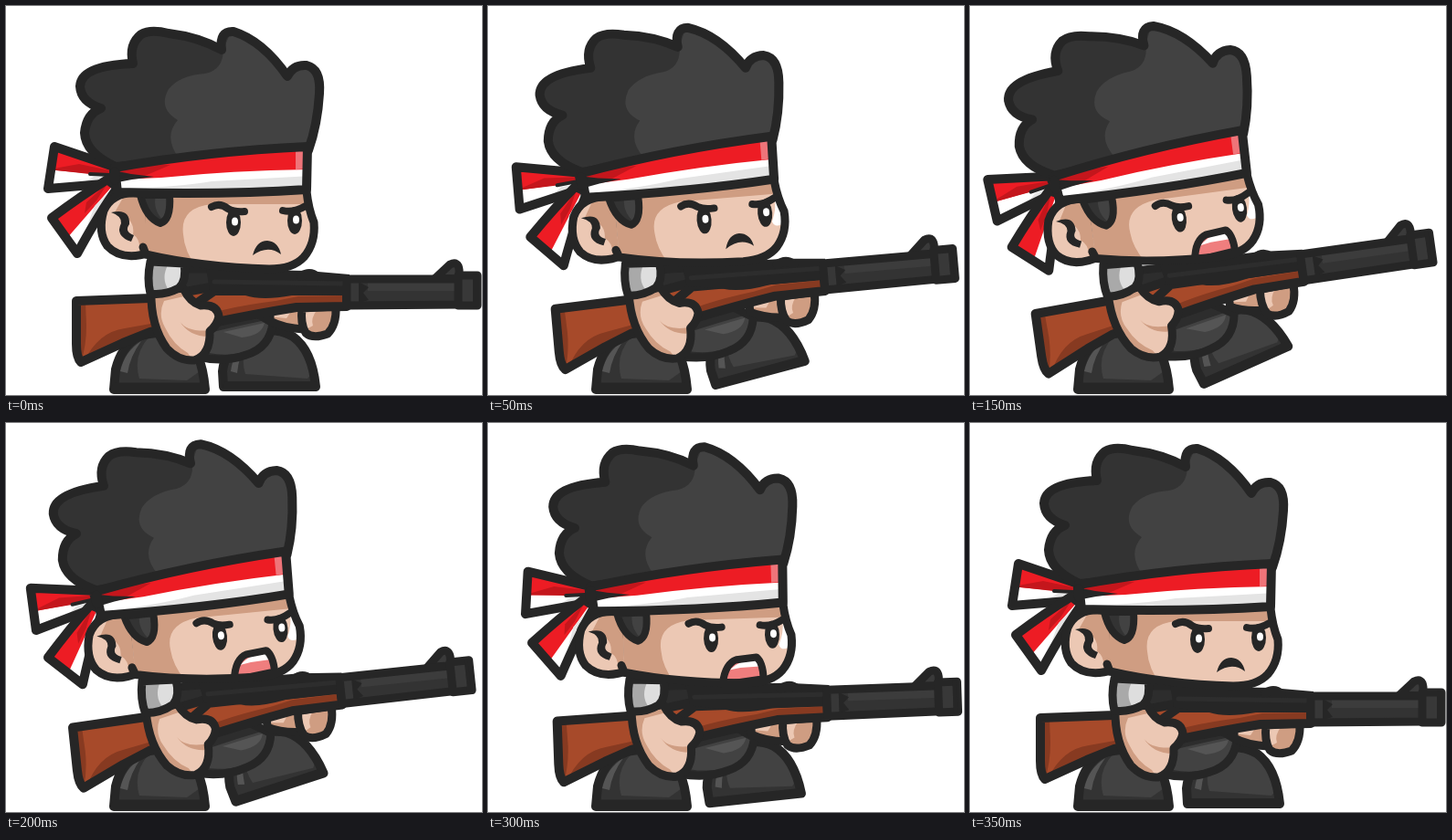
An HTML page with a canvas that plays this animation: 521 px wide and 426 px high, repeating every 0.5 s.

```html
<!DOCTYPE html>
<html lang="en">
<head>
<meta charset="utf-8">
<title>Soldier aiming</title>
<style>
html, body { margin: 0; width: 100%; height: 100%; overflow: hidden; background: #fff; }
canvas { display: block; width: 521px; height: 426px; }
</style>
</head>
<body>
<canvas id="stage" width="521" height="426"></canvas>
<script>
const ctx = document.getElementById('stage').getContext('2d');
const LOOP = 500, STEP = 50;
const INK = '#262626', HAIR = '#333333', GREY = '#424242', PALE_GREY = '#555555';
const RED = '#ed1c24', DEEP_RED = '#c4161c', WHITE = '#ffffff', SILVER = '#e4e4e4';
const SKIN = '#ecc8b4', TAN = '#cf9d82';
const WOOD = '#a74a2a', DARK_WOOD = '#873a21';

const cache = new Map();
function path(d) {
  if (!cache.has(d)) cache.set(d, new Path2D(d));
  return cache.get(d);
}
function fill(d, color) {
  ctx.fillStyle = color;
  ctx.fill(path(d));
}
function line(d, width = 10, color = INK) {
  ctx.lineWidth = width;
  ctx.strokeStyle = color;
  ctx.stroke(path(d));
}
// Outlined shape whose shading is clipped to its inside.
function shape(d, color, shades = [], width = 10) {
  fill(d, color);
  ctx.save();
  ctx.clip(path(d));
  for (const [s, c] of shades) fill(s, c);
  ctx.restore();
  line(d, width);
}
function oval(x, y, rx, ry, color) {
  ctx.fillStyle = color;
  ctx.beginPath();
  ctx.ellipse(x, y, rx, ry, 0, 0, Math.PI * 2);
  ctx.fill();
}
// Turns a part about the joint (x, y), which itself shifts by (dx, dy).
function part(amount, x, y, dx, dy, degrees, draw) {
  ctx.save();
  ctx.translate(x + dx * amount, y + dy * amount);
  ctx.rotate(degrees * amount * Math.PI / 180);
  ctx.translate(-x, -y);
  draw();
  ctx.restore();
}

function frontFoot() {
  shape('M238 417 L237 400 Q240 375 260 362 Q289 348 314 362 Q335 377 339 417 Z', HAIR, [
    ['M270 362 Q310 348 340 396 L330 408 L262 403 Q255 382 270 362Z', GREY],
    ['M246 400 Q249 378 263 368 Q255 383 253 402Z', PALE_GREY]
  ]);
  line('M242 416 L337 416', 10);
}

function backFoot() {
  shape('M118 420 L120 398 Q126 373 145 362 Q170 354 193 362 Q214 374 218 420 Z', HAIR, [
    ['M158 361 Q205 351 215 398 L198 410 L146 408 Q138 382 158 361Z', GREY],
    ['M125 400 Q130 378 148 367 Q136 383 133 402Z', PALE_GREY]
  ]);
  line('M121 418 L215 418', 11);
}

function body() {
  shape('M168 288 L228 288 L246 320 L292 347 Q289 374 263 382 Q238 391 209 384 L166 325Z', '#2d2d2d', [
    ['M222 358 Q255 350 289 343 L284 370 Q255 386 222 380Z', GREY],
    ['M238 357 L283 347 Q280 361 258 363Z', PALE_GREY]
  ], 9);
}

function frontArm() {
  shape('M289 327 L326 326 L326 354 Q304 353 289 345Z', TAN, [
    ['M289 325 L315 330 L307 342 L289 340Z', SKIN]
  ], 9);
  shape('M324 331 L361 329 Q362 349 352 359 Q336 365 328 358 Q322 348 324 331Z', TAN, [
    ['M324 330 L341 332 Q333 342 336 350 L327 355Z', SKIN]
  ], 9);
}

function gun() {
  shape('M77 323 L158 320 L229 307 L229 343 L158 357 L128 369 Q104 380 82 390 Q77 385 77 370Z', WOOD, [
    ['M77 322 L87 325 L88 350 Q88 372 82 390 L72 390Z', DARK_WOOD],
    ['M84 392 Q100 357 130 353 L175 345 L175 365 L128 376Z', DARK_WOOD]
  ]);
  shape('M201 331 L228 312 L373 312 L373 329 L318 330 Q274 337 226 347 L205 345Z', WOOD, [
    ['M203 345 Q230 331 295 323 L320 318 L376 317 L376 333 L225 350Z', DARK_WOOD]
  ]);
  fill('M219 288 L330 290 L376 294 L376 316 L313 317 Q280 323 262 317 L223 311 Z', INK);
  line('M323 296 Q333 290 341 297', 10);
  line('M228 302 L368 304', 5, '#2d2d2d');
  shape('M470 298 L486 283 Q495 279 496 289 L496 299Z', '#3a3a3a', [], 9);
  shape('M373 299 L497 299 L497 327 L373 328Z', HAIR, [
    ['M396 299 L497 299 L497 312 L396 312Z', '#3c3c3c'],
    ['M376 303 L386 303 L386 324 L376 324Z', '#373737'],
    ['M386 302 L397 308 L391 314 L397 322 L386 325Z', INK]
  ], 9);
  shape('M495 295 L516 295 L516 328 L495 328Z', '#383838', [
    ['M511 290 L518 290 L518 334 L511 334Z', '#303030']
  ], 9);
  line('M513 295 L513 328', 4);
}

function backArm() {
  shape('M159 313 L194 309 Q201 324 213 328 Q231 326 233 340 Q231 350 223 356 Q224 382 206 388 Q189 389 176 375 Q158 350 159 313Z', SKIN, [
    ['M156 312 L197 308 L199 317 L173 323 Q166 338 174 352 Q183 371 199 380 L207 392 L180 385 L153 345Z', TAN],
    ['M190 345 Q198 358 226 355 L222 362 Q200 362 190 345Z', TAN]
  ], 9);
  shape('M158 280 L195 282 Q198 301 189 309 Q174 317 158 315 Q154 299 158 280Z', '#a9a9a9', [
    ['M178 282 L194 282 L191 305 L178 311 Q169 298 178 282Z', '#dedede']
  ], 9);
}

function tails(p) {
  part(p, 118, 187, 0, 0, -17.5, () => {
    shape('M53 154 L118 176 L118 194 L46 200Z', WHITE, [
      ['M50 148 L120 172 L120 186 L44 179Z', RED],
      ['M47 179 L80 173 L118 181 L118 187Z', DEEP_RED],
      ['M72 200 L96 187 L118 188 L118 198Z', SILVER]
    ]);
    line('M92 184 L113 185', 4);
  });
  part(p, 118, 187, 0, 0, -18, () => {
    shape('M50 232 Q82 208 111 190 L122 199 Q102 227 78 271Z', WHITE, [
      ['M45 231 L115 186 L120 193 L67 254Z', RED],
      ['M88 215 L112 193 L99 213 L86 227Z', DEEP_RED],
      ['M82 259 L97 219 L118 198 L90 262Z', SILVER]
    ]);
  });
}

function hair() {
  shape('M120 176 Q87 161 86 139 Q88 118 104 112 Q82 105 81 88 Q82 65 139 63 Q134 42 148 31 Q158 25 178 30 Q211 34 236 48 Q233 27 249 28 Q281 38 308 77 Q314 64 329 65 Q345 69 343 96 Q341 130 331 158Z', HAIR, [
    ['M238 47 Q238 70 218 74 Q190 76 178 91 Q166 112 188 125 Q172 143 189 166 L337 160 L350 66 L250 20Z', GREY]
  ]);
}

function mouth(open) {
  if (!open) {
    fill('M270 273 Q274 257 286 257 Q298 258 301 272 Q287 261 270 273Z', INK);
    return;
  }
  shape('M260 289 Q263 266 276 262 L298 260 Q305 266 305 284Z', '#ef7e7e', [
    ['M268 273 Q284 259 305 262 L305 270 L280 271Z', WHITE]
  ], 8);
}

function eyes() {
  for (const [x, y] of [[249, 237], [316, 235]]) {
    oval(x, y, 8, 15, INK);
    oval(x + 1.5, y - 1, 3.5, 4.5, WHITE);
  }
  line('M225 220 Q234 215 243 222 Q250 226 261 225', 8);
  line('M303 224 Q314 227 328 219', 8);
}

function face(p, open) {
  shape('M157 207 Q119 198 107 224 Q100 248 111 263 Q127 280 158 270Z', SKIN, [
    ['M132 203 L160 203 L160 272 L146 270 Q148 256 139 250 Q142 232 119 226Z', TAN]
  ], 9);
  fill('M115 226 Q136 221 135 239 Q129 247 140 251 L137 258 Q119 252 126 238 Q127 230 115 226Z', INK);

  const head = 'M153 204 L329 203 Q331 222 337 237 Q339 260 326 275 Q314 288 288 288 Q214 286 153 272Z';
  fill(head, SKIN);
  ctx.save();
  ctx.clip(path(head));
  fill('M150 204 L331 202 L331 217 L225 217 Q190 221 194 250 Q195 269 211 290 L150 279Z', TAN);
  if (p > 0) fill('M328 221 Q338 236 333 251 Q325 254 323 247 Q329 234 328 221Z', WHITE);
  mouth(open);
  ctx.restore();
  line('M329 203 Q331 222 337 237 Q339 260 326 275 Q314 288 288 288 Q214 286 153 272 L150 264', 9);
  shape('M147 207 Q153 232 169 238 Q181 234 179 207Z', HAIR, [
    ['M164 207 L180 207 L173 236 Q160 223 164 207Z', GREY]
  ], 8);
  part(p, 249, 237, 0, 4.5, 0, eyes);
}

function band() {
  shape('M119 177 Q220 159 330 154 L329 201 Q240 207 122 204Z', WHITE, [
    ['M116 174 L333 150 L333 179 Q250 180 170 188 L121 190Z', RED],
    ['M317 152 L333 152 L333 178 L317 179Z', '#ef7479'],
    ['M121 179 Q148 173 180 174 L152 186 L121 190Z', DEEP_RED],
    ['M130 200 Q190 198 225 192 L333 186 L333 208 L130 208Z', SILVER]
  ]);
  fill('M117 180 L137 184 L162 187 L138 190 L117 194Z', INK);
  oval(119, 186, 6, 10, INK);
}

function draw(p, open) {
  ctx.fillStyle = WHITE;
  ctx.fillRect(0, 0, 521, 426);
  ctx.lineJoin = ctx.lineCap = 'round';
  part(p, 238, 418, 23, -4, -30, frontFoot);
  backFoot();
  part(p, 245, 385, 2, -6, -8, body);
  part(p, 74, 321, -7, 18, -10, () => {
    frontArm();
    gun();
  });
  part(p, 178, 300, -12, 1, -9.6, backArm);
  part(p, 120, 185, -33, 12, -9.5, () => {
    tails(p);
    face(p, open);
    hair();
    band();
  });
}

// Quick lift over two steps, then a slower return over five.
let start;
function tick(now) {
  start ??= now;
  const step = Math.floor((now - start) % LOOP / STEP);
  const lift = step <= 2 ? step / 2 : Math.max(0, (7 - step) / 5);
  draw(lift, step >= 2 && step < 7);
  requestAnimationFrame(tick);
}
requestAnimationFrame(tick);
</script>
</body>
</html>
```
